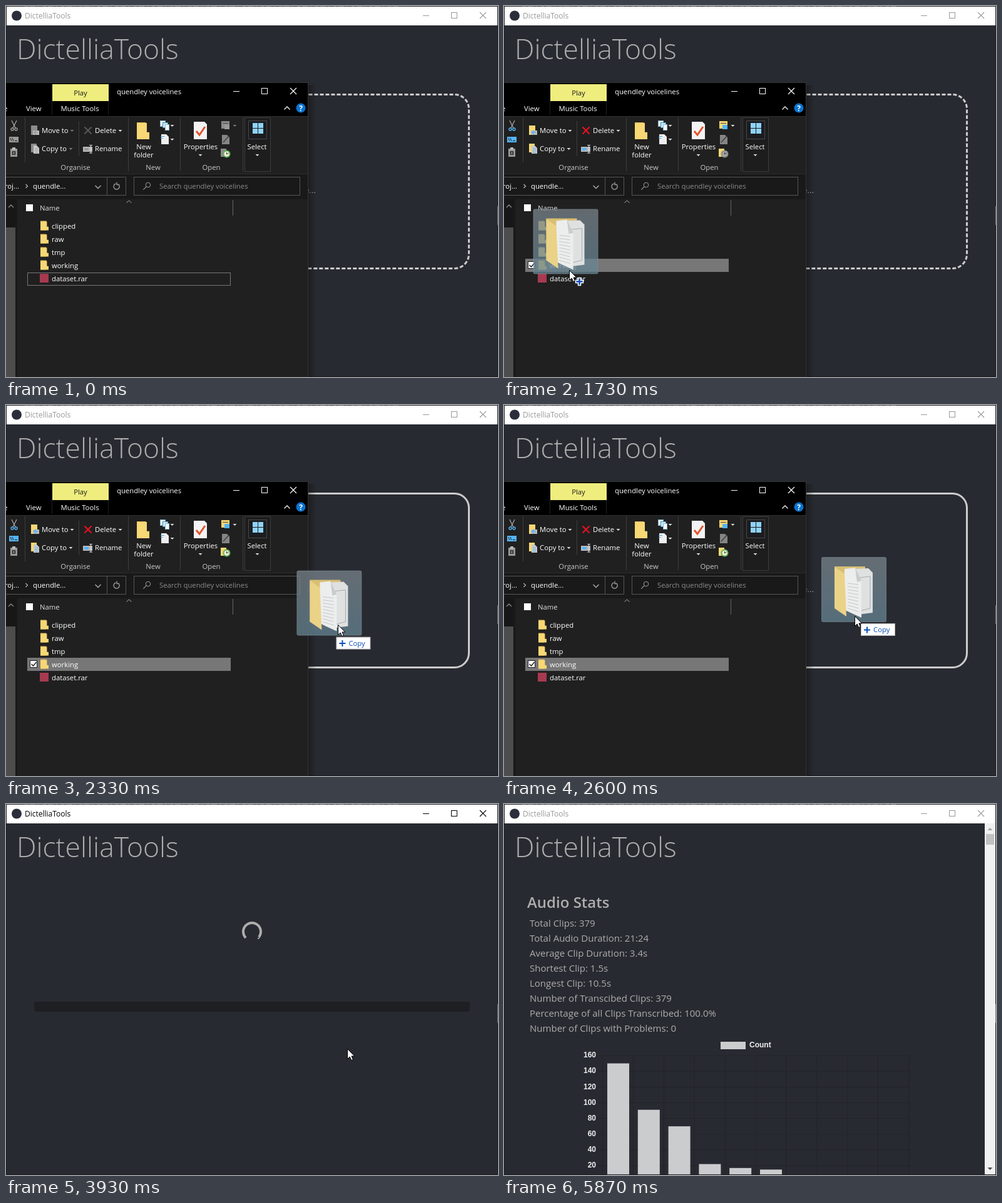
An HTML page that plays this animation: 786x593 px, repeating every 6.07 s.

```html
<!DOCTYPE html>
<html lang="en">
<head>
<meta charset="utf-8">
<title>DictelliaTools</title>
<style>
html, body { margin: 0; width: 100%; height: 100%; overflow: hidden; background: #282a31; }
svg { display: block; }
text { font: 11.3px "Open Sans", "Noto Sans", sans-serif; white-space: pre; }
#stage { width: 100%; height: 100%; --ink: #999; --title: #999; --y: #8c8c8c; --b: #9a9a9a; --r: #555; --dim: #777; --g: #5fb35b; --cream: #f5f1dc; }
#stage.active { --ink: #000; --title: #000; }
#stage.picked { --y: #f7d774; --b: #55b4f5; --r: #e81123; --dim: #ddd; }
#stage.busy { --g: #8c8c8c; --cream: #a5a5a5; }
.mid { text-anchor: middle; }
.end { text-anchor: end; }
.big { font-size: 44.5px; font-weight: 300; }
.head { font-size: 24px; font-weight: 600; }
.stat { font-size: 15px; }
.axis { font: bold 12px "Liberation Sans", Arial, sans-serif; }
</style>
</head>
<body>
<svg id="stage" viewBox="0 0 786 593"></svg>
<script>
const stage = document.getElementById('stage');
const rect = (x, y, w, h, fill, more = '') =>
  `<rect x="${x}" y="${y}" width="${w}" height="${h}" style="fill:${fill}" ${more}/>`;
const frame = (x, y, w, h, color, fill = 'none') => rect(x, y, w, h, fill, `stroke="${color}"`);
const text = (x, y, s, fill = '#fff', cls = '') =>
  `<text x="${x}" y="${y}" class="${cls}" style="fill:${fill}">${s}</text>`;
const line = (d, color, w = 1) => `<path d="${d}" style="fill:none;stroke:${color};stroke-width:${w}"/>`;
const shape = (d, fill, more = '') => `<path d="${d}" style="fill:${fill}" ${more}/>`;
const circle = (x, y, r, fill) => `<circle cx="${x}" cy="${y}" r="${r}" style="fill:${fill}"/>`;
const caret = (x, y, fill = '#ddd') => shape(`M${x - 3} ${y - 1}h6l-3 3z`, fill);
const group = (id, body) => `<g id="${id}">${body}</g>`;
const list = (n, fn) => Array.from({ length: n }, (_, i) => fn(i)).join('');
const buttons = (x, y, c) =>
  line(`M${x} ${y + .5}h10`, c) + frame(x + 45.5, y - 4.5, 9, 9, c) +
  line(`M${x + 91} ${y - 5}l10 10m0 -10l-10 10`, c, 1.2);
const folder = (x, y, w, h, fill = '#f8d775') =>
  rect(x, y, w * .72, h, '#e0b552') + shape(`M${x} ${y + 1}h${w * .8}v${h * .55}h${w * .2}v${h * .45 - 1}h${-w}z`, fill);
const page = (x, y, w, h, fill) =>
  shape(`M${x} ${y}h${w - 4}l4 4v${h - 4}h${-w}z`, fill);

const appWindow =
  rect(0, 0, 786, 593, '#282a31') +
  rect(0, 0, 786, 1, '#242424') + line('M30 .5H630', '#4a4a4a') .replace('/>', ' stroke-dasharray="5 3 9 4 2 6"/>') +
  rect(1, 1, 784, 30, '#fff') +
  circle(17, 15.5, 8, '#2b2e3a') +
  text(30, 20, 'DictelliaTools', 'var(--title)').replace('style="', 'style="font-size:12px;') +
  buttons(666, 15, 'var(--ink)') +
  text(17, 85, 'DictelliaTools', '#adadad', 'big');

const dropZone =
  '<rect id="zone" x="46.5" y="141.5" width="693" height="278" rx="23" fill="none" stroke="#ccc" stroke-width="3"/>' +
  text(495, 299, 'Drop a folder here...', '#adadad', 'end').replace('style="', 'style="font-size:13px;');

const loader =
  '<circle id="spin" cx="393" cy="204" r="14" fill="none" stroke="#adadad" stroke-width="4" pathLength="4" stroke-dasharray="3 1"/>' +
  rect(45, 316, 696, 16, '#1d1f23', 'rx="4"') +
  '<svg id="fill" x="45" y="316" width="0" height="16">' +
  rect(0, 0, 14, 16, '#5bc0de', 'rx="3"') + text(0, 12.4, '37', '#222') + '</svg>';

const stats = ['Total Clips: 379', 'Total Audio Duration: 21:24', 'Average Clip Duration: 3.4s', 'Shortest Clip: 1.5s',
  'Longest Clip: 10.5s', 'Number of Transcibed Clips: 379', 'Percentage of all Clips Transcribed: 100.0%',
  'Number of Clips with Problems: 0'];
const levelY = v => 603.2 - v * 1.2575;
const chart =
  list(8, i => line(`M149 ${levelY(160 - 20 * i)}H649`, '#222429') +
    text(147, 405.3 + 25.15 * i, 160 - 20 * i, '#eee', 'axis end')) +
  list(11, i => line(`M${157.5 + 48.9 * i} 402V592`, '#222429')) +
  [150, 91, 70, 22, 17, 15].map((v, i) =>
    rect(165 + 48.8 * i, levelY(v), 35, 592 - levelY(v), '#cbccce')).join('') +
  rect(346, 380, 40, 12, '#cbccce') + text(392, 389, 'Count', '#eee', 'axis');
const results =
  text(37, 166, 'Audio Stats', '#adadad', 'head') +
  stats.map((s, i) => text(41, 196 + 24 * i, s, '#adadad', 'stat')).join('') +
  group('chart', chart) +
  rect(768, 31, 17, 561, '#f1f1f1') + rect(770, 48, 13, 17, '#c1c1c1') +
  shape('M772.5 42h8l-4 -4z', '#a3a3a3') + shape('M772.5 581h8l-4 4z', '#505050');

const ribbon =
  rect(0, 176, 483, 92, '#202020') + line('M0 176.5H483', '#303030') +
  line('M30.5 178V250M116.5 184V240M195.5 178V264M278.5 178V264M378.5 178V264', '#3d3d3d') +
  // clipboard column
  line('M9 183l6 12M17 183l-6 12', '#a8a8a8', 1.3) +
  '<g style="fill:none;stroke:var(--b);stroke-width:1.4"><circle cx="10" cy="197" r="2"/><circle cx="16" cy="197" r="2"/></g>' +
  rect(5, 209, 15, 9, 'var(--b)') + line('M7 211l2 5M10 211l2 5M14 215.5h4', '#222') +
  rect(7, 228, 11, 13, '#999') + rect(10, 226, 5, 4, '#bbb') + line('M10.5 238V233h4v4h-3', '#222', 1.4) +
  // organise
  rect(40, 191, 10, 15, 'var(--y)') + rect(43, 199, 10, 7, '#bbb') + line('M51 202h-6l3 -3m-3 3l3 3', 'var(--b)', 1.6) +
  text(57, 203, 'Move to') + caret(105.5, 199, 'var(--dim)') +
  rect(40, 220, 9, 14, 'var(--y)') + page(44, 223, 9, 13, '#c8c8c8') + line('M46 228h5M46 231h5M46 234h5', 'var(--b)') +
  text(57, 232, 'Copy to') + caret(103.5, 228, 'var(--dim)') +
  line('M125.5 193.5l11 11m0 -11l-11 11', 'var(--r)', 2.2) +
  text(142, 203, 'Delete') + caret(182.5, 199) +
  rect(123, 225, 15, 8, '#b9b9b9') + rect(125, 227, 7, 4, 'var(--b)') + line('M133 222.5h5M135.5 222V235M133 235h5', '#ddd') +
  text(142, 232, 'Rename') + text(111, 262, 'Organise', '#c9c9c9', 'mid') +
  // new
  folder(209, 186, 20, 27) + text(220, 229, 'New', '#fff', 'mid') + text(220, 242, 'folder', '#fff', 'mid') +
  frame(246.5, 183.5, 8, 9, '#8db8d0', '#e8f2f8') + frame(250.5, 186.5, 8, 8, '#3d91bd', '#cfe8f5') +
  frame(254.5, 189.5, 6, 9, '#8db8d0', '#f4f8fa') + caret(265.5, 191) +
  page(248, 205, 12, 16, '#eee') + line('M247 208.5h6M247 211.5h4', '#4aa3d8') + caret(265.5, 213) +
  text(235, 262, 'New', '#c9c9c9', 'mid') +
  // open
  page(300, 185, 21, 28, '#f3f3f3') + line('M304 200l5 6l9 -13', '#e2552c', 3) +
  text(311, 229, 'Properties', '#fff', 'mid') + caret(310.5, 238) +
  rect(344, 184, 13, 12, 'var(--y)') + rect(349, 190, 8, 7, 'var(--b)') + line('M346 187.5h9', '#444') + caret(365.5, 191, 'var(--dim)') +
  page(345, 206, 12, 15, '#858585') + line('M347 218l9 -10', '#444', 1.6) +
  rect(343, 228, 9, 13, 'var(--y)') + circle(352.5, 236.5, 6, 'var(--g)') + circle(352.5, 236.5, 4, 'var(--cream)') +
  line('M352.5 234v3l3 -2', '#333') +
  text(328, 262, 'Open', '#c9c9c9', 'mid') +
  // select
  frame(381.5, 178.5, 41, 86, '#3c3c3c', '#1d1d1d') + frame(387.5, 183.5, 29, 29, '#484848', '#1a1c21') +
  list(4, i => rect(394 + i % 2 * 9, 187 + (i >> 1) * 9, 8, 8, '#8fd3fb')) +
  text(401, 229, 'Select', '#fff', 'mid') + caret(401.5, 238);

const explorer =
  rect(483, 126, 13, 467, 'url(#shade)') +
  rect(0, 122, 483, 471, '#202020') + rect(0, 122, 483, 54, '#000') +
  rect(74, 125, 90, 27, '#efed7e') + text(119, 143, 'Play', '#1a1a1a', 'mid') +
  text(177, 141, 'quendley voicelines') + buttons(363, 136, '#fff') +
  text(-4, 168, 'e') + text(32, 168, 'View') + text(118, 168, 'Music Tools', '#fff', 'mid') +
  line('M73.5 152V174M163.5 152V174', '#222') +
  line('M444.5 165.5l4.5 -4.5l4.5 4.5', '#ccc', 1.7) + circle(471, 163, 7.5, '#0b74d1') +
  text(471, 167.5, '?', '#fff', 'mid').replace('style="', 'style="font-weight:700;font-size:12px;') +
  ribbon +
  rect(0, 268, 483, 41, '#191919') + line('M0 268.5H483', '#2c2c2c') +
  line('M0 273.5H191.5V302.5H0M161.5 274V302', '#555') + frame(204.5, 273.5, 265, 29, '#555') +
  text(21, 292, 'proj...', '#fff', 'end') + line('M31.5 285l3 3l-3 3', '#bbb', 1.2) + text(43, 292, 'quendle...') +
  line('M142.5 287l4.5 4.5l4.5 -4.5', '#aaa', 1.5) +
  line('M180.5 286a4.6 4.6 0 1 1 -5 -2M177 281.5v4h4', '#999', 1.4) +
  '<circle cx="227" cy="286" r="3.8" fill="none" stroke="#999"/>' + line('M224.3 288.7l-5 5', '#999', 1.2) +
  text(245, 292, 'Search quendley voicelines', '#8c8c8c') +
  rect(0, 309, 18, 284, '#191919') + rect(0, 309, 15, 45, '#171717') + rect(0, 354, 15, 239, '#4d4d4d') +
  line('M4 322l4 -4l4 4', '#888', 1.4) +
  rect(32, 317, 11, 11, '#fff') + text(54, 327, 'Name', '#e0e0e0') +
  line('M192.5 314.5l4 -3.5l4 3.5', '#aaa') + line('M362.5 310V335', '#666') +
  rect(34, 404, 325, 21, 'var(--row)', 'id="rowA"') + rect(34, 426, 325, 20, '#4d4d4d', 'id="rowB"') +
  group('focus', frame(34.5, 426.5, 324, 20, '#777')) +
  group('box', rect(38, 409, 12, 12, '#fff')) +
  group('tick', frame(38.5, 408.5, 11, 11, '#222', '#fff') + line('M40.5 414l3 3l5 -6', '#111', 1.3)) +
  ['clipped', 'raw', 'tmp', 'working'].map((s, i) =>
    folder(55, 343.5 + 21 * i, 13, 15) + text(73, 356 + 21 * i, s)).join('') +
  rect(54, 428, 14, 14, '#a83a50') + text(73, 440, 'dataset.rar') +
  line('M482.5 122V593M0 122.5H483', '#343434');

const ghost =
  rect(.5, .5, 103, 103, 'url(#glass)', 'rx="2" stroke="#83929b" stroke-opacity=".6"') +
  shape('M21 15H70V82H21z', '#d9bf73') +
  shape('M52 19L75 18L82 25V89L58 92z', '#dfe1e1') + line('M60 33L78 31V82L62 86', '#a7acae') +
  shape('M37 19L54 17L64 38V97L36 84z', '#eceded') + shape('M54 17L64 38L57 40z', '#c9cccd') +
  list(9, i => line(`M42 ${42 + 5 * i}l17 ${2 + i * .4}`, '#c3c7c9')) +
  shape('M21 16L37 27L40 95L21 82z', '#ead287');

stage.innerHTML =
  `<defs>
    <linearGradient id="shade"><stop stop-opacity=".3"/><stop offset="1" stop-opacity="0"/></linearGradient>
    <linearGradient id="glass" x2="0" y2="1"><stop stop-color="#79838a" stop-opacity=".75"/><stop offset="1" stop-color="#648493" stop-opacity=".75"/></linearGradient>
  </defs>` +
  appWindow + group('drop', dropZone) + group('load', loader) + group('results', results) +
  line('M.5 1V593M785.5 1V593M0 592.5H786', '#1b1b1d') + rect(785, 320, 1, 30, '#777') +
  group('explorer', explorer) +
  group('ghost', ghost) +
  group('badge', shape('M-2 -6h4v4h4v4h-4v4h-4v-4h-4v-4h4z', '#1550b0', 'stroke="#fff" stroke-width="1.5"') ) +
  group('copy', frame(.5, .5, 54, 19, '#b8b8b8', '#fff') + line('M5 10.5h10M10 5.5v10', '#0b4fb3', 2) + text(20, 14, 'Copy', '#0b4fb3')) +
  group('cursor', shape('M.5 .5V16.5L4.2 13L6.8 18.6L9.4 17.5L7 12H11.8z', '#fff', 'stroke="#000"'));

const $ = id => document.getElementById(id);
const show = (id, on) => $(id).style.display = on ? '' : 'none';
const place = (id, x, y) => $(id).setAttribute('transform', `translate(${x.toFixed(1)} ${y.toFixed(1)})`);

// pointer stops: time, x, y
const path = [
  [270, 190, 532], [400, 158, 470], [530, 124, 430], [730, 101, 414], [1070, 101, 414], [1130, 100, 414],
  [1400, 94, 414], [1670, 94, 414], [1730, 104, 422], [1870, 165, 450], [2000, 264, 429], [2070, 330, 424],
  [2270, 502, 368], [2330, 530, 351], [2470, 553, 339], [2570, 560, 337], [3600, 559, 337], [3930, 545, 391],
  [4270, 403, 537], [4470, 320, 612]];
function pointer(t) {
  const i = Math.max(1, path.findIndex(p => p[0] >= t));
  const [a, x, y] = path[i - 1], [b, u, v] = path[i];
  const f = Math.max(0, (t - a) / (b - a));
  return [x + (u - x) * f, y + (v - y) * f];
}

function draw(t) {
  const browsing = t < 3000, picked = t >= 1670, dragging = t >= 1730 && browsing;
  const over = t >= 2330 && browsing;
  stage.classList.toggle('active', t >= 3000 && t < 5870);
  stage.classList.toggle('picked', picked);
  stage.classList.toggle('busy', picked && t < 2200);
  show('drop', browsing);
  show('explorer', browsing);
  show('load', t >= 3000 && t < 5130);
  show('results', t >= 5130);
  show('chart', t >= 5470);
  $('zone').setAttribute('stroke-dasharray', over ? 'none' : '6 3');

  const moving = t >= 270 && t < 4470;
  show('cursor', moving);
  show('ghost', dragging);
  show('badge', dragging && !over);
  show('copy', over);
  let hoverA = false, hoverB = false;
  if (moving) {
    const [x, y] = pointer(t), [gx, gy] = pointer(t - 27);
    place('cursor', x, y);
    place('ghost', gx - 53, gy - 94);
    place('badge', gx + 21, gy + 22);
    place('copy', gx + 10, gy + 12);
    const inside = gx > 34 && gx < 359;
    hoverA = inside && gy >= 404 && gy < 425;
    hoverB = inside && gy >= 425 && gy < 447;
  }
  show('rowA', picked || hoverA);
  $('rowA').style.fill = picked ? '#777' : '#4d4d4d';
  show('rowB', hoverB);
  show('focus', !picked);
  show('box', hoverA && !picked);
  show('tick', picked);

  $('spin').setAttribute('transform', `rotate(${135 + (t - 3930) * .48} 393 204)`);
  const p = Math.min(1, Math.max(0, (t - 4130) / 600));
  $('fill').setAttribute('width', 14 * (1 - (1 - p) ** 1.7));
}

function tick() {
  const k = Math.floor((performance.now() % 6070 + 4) * 15 / 1000);
  draw(Math.round(k * 20 / 3) * 10 % 6070);
  requestAnimationFrame(tick);
}
tick();
</script>
</body>
</html>
```
